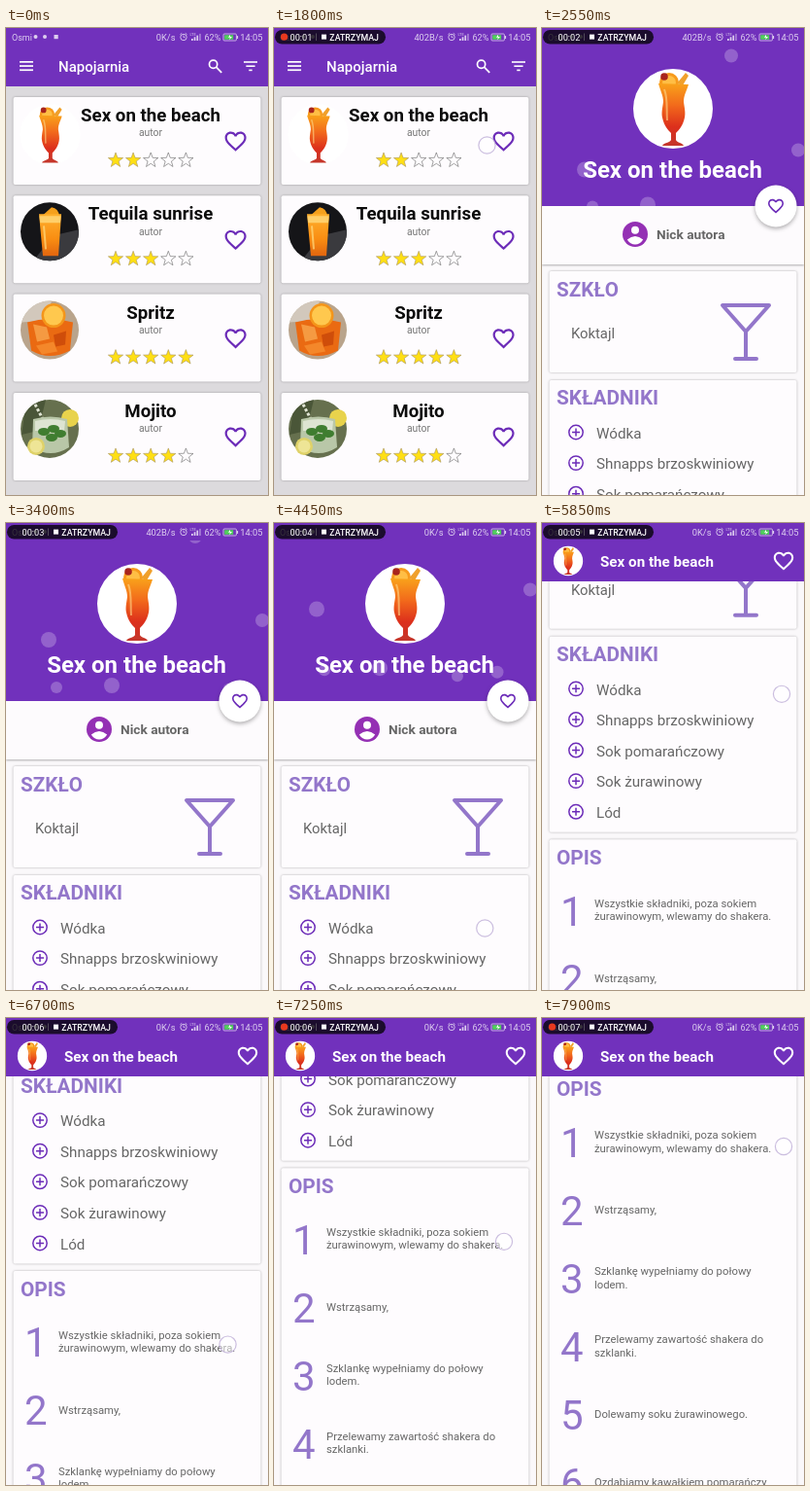
Recreate the animation shown at these times as an HTML page. Size 270 by 480 pixels, loop 8 s.

```html
<!DOCTYPE html>
<html lang="pl">
<head>
<meta charset="utf-8">
<title>Napojarnia</title>
<style>
html, body { margin: 0; width: 100%; height: 100%; overflow: hidden; background: #dcdadd; }
svg { display: block; width: 100vw; height: 100vh; font-family: Roboto, sans-serif; }
.b { font-weight: 700; }
.m { font-weight: 500; }
.mid { text-anchor: middle; }
.end { text-anchor: end; }
.card { fill: #fefcfe; filter: drop-shadow(0 .8px .8px rgba(0, 0, 0, .3)); }
.line { fill: none; stroke: #6c2cb8; stroke-width: 1.5; }
</style>
</head>
<body>
<svg id="stage" viewBox="0 0 270 480"></svg>
<script>
const LOOP = 8000;
const PURPLE = '#7131bc', ACCENT = '#6c2cb8', SOFT = '#9376ca', GREY = '#666';
const HEART = 'M16.5 3c-1.74 0-3.41.81-4.5 2.09C10.91 3.81 9.24 3 7.5 3 4.42 3 2 5.42 2 8.5c0 3.78 3.4 6.86 8.55 11.54L12 21.35l1.45-1.32C18.6 15.36 22 12.28 22 8.5 22 5.42 19.58 3 16.5 3zm-4.4 15.55l-.1.1-.1-.1C7.14 14.24 4 11.39 4 8.5 4 6.5 5.5 5 7.5 5c1.54 0 3.04.99 3.57 2.36h1.87C13.46 5.99 14.96 5 16.5 5c2 0 3.5 1.5 3.5 3.5 0 2.89-3.14 5.74-7.9 10.05z';

const text = (x, y, size, fill, str, cls = '', extra = '') =>
  `<text x="${x}" y="${y}" font-size="${size}" fill="${fill}" class="${cls}" ${extra}>${str}</text>`;
const rect = (x, y, w, h, fill, extra = '') =>
  `<rect x="${x}" y="${y}" width="${w}" height="${h}" fill="${fill}" ${extra}/>`;
const circle = (x, y, r, fill, extra = '') =>
  `<circle cx="${x}" cy="${y}" r="${r}" fill="${fill}" ${extra}/>`;
const path = (d, fill, extra = '') => `<path d="${d}" fill="${fill}" ${extra}/>`;
const group = (attrs, body) => `<g ${attrs}>${body}</g>`;
const card = (y, h) => `<rect class="card" x="7.5" y="${y}" width="255" height="${h}" rx="2"/>`;
const heart = (x, y, k, fill) =>
  path(HEART, fill, `transform="translate(${x} ${y}) scale(${k}) translate(-12 -12)"`);

function star(x, y, on) {
  const pts = Array.from({ length: 10 }, (_, i) => {
    const r = i % 2 ? 3.3 : 8, a = i * Math.PI / 5;
    return `${(x + r * Math.sin(a)).toFixed(2)},${(y - r * Math.cos(a)).toFixed(2)}`;
  });
  return `<polygon points="${pts.join(' ')}" fill="${on ? '#ffdf14' : '#fefcfe'}" stroke="${on ? '#a8935a' : '#666'}" stroke-width=".6"/>`;
}

// Round drink picture, centred on 0,0 with radius 41
const cocktail =
  circle(0, 0, 41, '#fff') +
  circle(-4, -27, 10, '#f79a1c') + circle(-4, -27, 7, '#ffbe45') +
  path('M4 -26L13 -37L16 -34L10 -24Z', '#f0a02c') + circle(-9, -33, 3.8, '#a8241c') +
  path('M-15 -26C-13 -18 -10 -14 -10 -7C-11 0 -12 4 -11 9C-9 18 -5 22 -2 25V32C-3 35 -10 35 -11 38H11C10 35 4 35 3 32V25C6 22 10 18 12 9C13 4 12 0 11 -7C11 -14 14 -18 16 -25Z', 'url(#drink)') +
  path('M-9 -20C-5 -10 -7 0 -6 12', 'none', 'stroke="#ffd98a" stroke-width="2" opacity=".6"');

const photos = [
  '',
  circle(0, 0, 30, '#151518') + path('M4 4L30 -2A30 30 0 0 1 -14 26.5Z', '#3a3a3e') +
    path('M-8 -16L2 -25Q9 -24 10 -16Z', '#f5a01d') +
    path('M-11 -18H12L9 25H-7Z', 'url(#juice)') + path('M-10.5 -16H11.5L11 -9H-9.8Z', '#ffcf6a') +
    path('M-6 -6L-4 18', 'none', 'stroke="#ffdc80" stroke-width="2" opacity=".7"'),
  circle(0, 0, 30, '#b9a48c') + path('M-29 -8A30 30 0 0 1 2 -30L-4 -10Z', '#d2c8bc') +
    path('M-23 -8Q0 -15 24 -8L21 21Q0 32 -19 21Z', '#ea6a12') + path('M-17 -6L-3 -3L0 9L-13 12Z', '#f59a42') +
    path('M4 5L17 1L16 15L6 17Z', '#cf4d0a') + path('M-14 16L4 12L8 22L-8 25Z', '#f4872a') +
    circle(4, -15, 12.5, '#f4951a') + circle(4, -15, 10, '#ffc84e'),
  circle(0, 0, 30, '#66704e') + path('M-26 -15A30 30 0 0 1 -4 -29.7L-12 2L-29 6Z', '#4a5638') +
    path('M-15 -25L-5 -6', 'none', 'stroke="#dfe3d2" stroke-width="3" stroke-dasharray="3 2"') +
    circle(21, -11, 9, '#e8d34c') +
    path('M-17 -10Q1 -15 18 -10L20 19Q1 31 -18 19Z', '#b9c7a8') +
    path('M-15 -8Q1 -12 16 -8L15 2H-15Z', '#dde4d2') +
    circle(-14, 18, 9, '#dfd269') + circle(-14, 18, 6.5, '#eee596') +
    [[-6, 3], [4, 0], [11, 5], [2, 9]].map(([x, y]) => `<ellipse cx="${x}" cy="${y}" rx="6" ry="4" fill="#3f7d30"/>`).join('')
];

const drinks = [['Sex on the beach', 2], ['Tequila sunrise', 3], ['Spritz', 5], ['Mojito', 4]];
const listRow = ([name, score], i) => group(`transform="translate(0 ${(i * 101.3).toFixed(1)})"`,
  card(71, 90) +
  (i ? group('transform="translate(45 108)"', photos[i]) : rect(7.5, 71, 255, 90, '#000', 'id="ripple"')) +
  text(149, 96, 18.7, '#0c0c0c', name, 'b mid') +
  text(149, 111.3, 10.4, '#777', 'autor', 'mid') +
  [0, 1, 2, 3, 4].map(k => star(113 + 18.1 * k, 136, k < score)).join('') +
  heart(236.6, 116.5, 1.1, ACCENT));

const list = rect(0, 0, 270, 480, '#dcdadd') + drinks.map(listRow).join('') +
  rect(0, 0, 270, 60, PURPLE) +
  [34, 38.2, 42.4].map(y => rect(14, y, 14, 1.7, '#fff')).join('') +
  text(54, 44.8, 15, '#fff', 'Napojarnia', 'm') +
  path('M216.8 40.4L222.2 45.8', 'none', 'stroke="#fff" stroke-width="1.8"') +
  circle(213.6, 37.2, 4.1, 'none', 'stroke="#fff" stroke-width="1.7"') +
  rect(245, 34.2, 14, 1.6, '#fff') + rect(247.4, 38.4, 9.2, 1.6, '#fff') + rect(250.3, 42.6, 3.4, 1.6, '#fff');

// x, y and radius at 3400 ms, then rise in px per second
const bubbles = [
  [44, 120, 8, 30], [109, 167, 8, 17], [52, 169, 6, 17], [195, 14, 7, 17],
  [264, 100, 7, 30], [189, 191, 6, 32], [230, 171, 6.5, 17]
];

const items = ['Wódka', 'Shnapps brzoskwiniowy', 'Sok pomarańczowy', 'Sok żurawinowy', 'Lód'];
const steps = [
  ['Wszystkie składniki, poza sokiem', 'żurawinowym, wlewamy do shakera.'],
  ['Wstrząsamy,'],
  ['Szklankę wypełniamy do połowy', 'lodem.'],
  ['Przelewamy zawartość shakera do', 'szklanki.'],
  ['Dolewamy soku żurawinowego.'],
  ['Ozdabiamy kawałkiem pomarańczy']
];
const itemRow = (name, i) => {
  const y = 416 + 31.6 * i;
  return circle(35, y - .5, 7.2, 'none', 'class="line"') +
    path(`M31 ${y - .5}h8M35 ${y - 4.5}v8`, 'none', 'class="line"') +
    text(56, y + 5.7, 15.2, GREY, name);
};
const stepRow = (lines, i) => {
  const y = 643.5 + 70 * i, top = y + (lines.length > 1 ? -3.3 : 3.7);
  return text(19, y + 15.3, 42, SOFT, i + 1) +
    lines.map((s, k) => text(54, top + 13.4 * k, 11.3, GREY, s)).join('');
};

const page =
  rect(0, 183, 270, 60, '#fdfbfd', 'style="filter:drop-shadow(0 1px 1px rgba(0,0,0,.3))"') +
  rect(0, 0, 270, 183, PURPLE) +
  group('clip-path="url(#head)"', bubbles.map(b => circle(b[0], 0, b[2], '#fff', 'class="bubble" opacity=".24"')).join('')) +
  text(134.5, 154, 24, '#fff', 'Sex on the beach', 'b mid') +
  circle(96, 212, 13, '#9430b4') + circle(96, 207.8, 4, '#fff') +
  path('M87.8 217.5Q96 210.5 104.2 217.5Q101 222.5 96 222.5Q91 222.5 87.8 217.5Z', '#fff') +
  text(118, 217, 13.7, GREY, 'Nick autora', 'b') +
  card(250, 104) + text(15, 276, 20.6, SOFT, 'SZKŁO', 'b') + text(30, 318.7, 14.8, GREY, 'Koktajl') +
  path('M186 285H234L210 312ZM210 312V340M199 340H221', 'none', `stroke="${SOFT}" stroke-width="4" stroke-linejoin="round" stroke-linecap="round"`) +
  card(362, 201) + text(15, 387, 20.8, SOFT, 'SKŁADNIKI', 'b') + items.map(itemRow).join('') +
  card(570.5, 520) + text(15, 596.3, 20.8, SOFT, 'OPIS', 'b') + steps.map(stepRow).join('') +
  group('id="fab"', circle(0, 0, 21.5, '#fff', 'style="filter:drop-shadow(0 2px 2px rgba(0,0,0,.3))"') + heart(0, 0, .8, ACCENT));

const bar = rect(0, 18, 270, 42, PURPLE) +
  group('transform="translate(27 39) scale(.37)"', cocktail) +
  text(60, 44.6, 15.2, '#fff', 'Sex on the beach', 'b') + heart(249, 39, 1.02, '#fff');

const indicators =
  text(6, 13, 9, '#fff', 'Osmi') +
  circle(30.5, 9, 2, '#fff') + circle(40, 9, 2, '#fff') + rect(49.5, 7, 4.2, 4.2, '#fff') +
  text(174.5, 13, 9.3, '#fff', '', 'end', 'id="speed"') +
  circle(183, 9.5, 3.2, 'none', 'stroke="#fff" stroke-width=".9"') +
  path('M183 7.5V9.7H184.6M179.4 6.8L181.2 5.2M186.6 6.8L184.8 5.2', 'none', 'stroke="#fff" stroke-width=".8"') +
  text(189.5, 8, 4, '#fff', 'LTE') +
  [0, 1, 2, 3].map(i => rect(191 + 2.7 * i, 11 - 1.7 * i, 1.7, 2 + 1.7 * i, '#fff', i > 2 ? 'opacity=".5"' : '')).join('') +
  text(204.5, 13, 9.1, '#fff', '62%') +
  rect(224, 6, 13.4, 7, 'none', 'rx="1" stroke="#fff" stroke-width=".8"') + rect(237.8, 8, 1.3, 3, '#fff') +
  text(264.5, 13, 9.3, '#fff', '14:05', 'end');

const status = rect(0, 0, 270, 18, PURPLE) +
  group('opacity=".76"', indicators) +
  rect(225.2, 7.2, 9, 4.6, '#4fd05a') + path('M231 6.7L229 9.8H231L230 12.2L233 9H231Z', '#fff') +
  group('id="pill"',
    rect(1, 2, 114, 14.5, '#000', 'rx="7.2" opacity=".76"') +
    circle(10.5, 9.2, 3.6, '#e8391f', 'id="dot"') +
    text(16.5, 12.7, 9.2, '#fff', '', '', 'id="clock"') +
    rect(43, 5.5, .6, 7.5, '#777') + rect(49, 6.6, 5, 5, '#fff') +
    text(57.3, 12.6, 8.8, '#fff', 'ZATRZYMAJ', 'm'));

const grad = (id, stops) => `<linearGradient id="${id}" x2="0" y2="1">` +
  stops.map(([o, c]) => `<stop offset="${o}" stop-color="${c}"/>`).join('') + '</linearGradient>';

document.getElementById('stage').innerHTML = '<defs>' +
  grad('drink', [[0, '#f9a21b'], [.35, '#f26a1b'], [.7, '#dc2f1c'], [1, '#c4372c']]) +
  grad('juice', [[0, '#ffb02e'], [.6, '#f98d12'], [1, '#e2650f']]) +
  '<clipPath id="head"><rect width="270" height="183"/></clipPath></defs>' +
  group('id="list"', list) +
  group('id="detail"', rect(0, 0, 270, 480, '#faf8fa') + group('id="page"', page)) +
  group('id="hero"', cocktail) + group('id="bar"', bar) +
  circle(0, 0, 8.6, '#fff', 'id="touch" fill-opacity=".5" stroke="#b9a8d4" stroke-opacity=".75" stroke-width="1.2"') +
  status;

const el = {};
for (const node of document.querySelectorAll('svg [id]')) el[node.id] = node;
const bubbleEls = document.querySelectorAll('.bubble');
const set = (node, name, value) => node.setAttribute(name, value);

const span = (t, a, b) => Math.min(1, Math.max(0, (t - a) / (b - a)));
const ease = p => p * p * (3 - 2 * p);
const mix = (a, b, p) => a + (b - a) * p;

// Linear track over rows of [time, value, value...]
function track(rows, t, col = 1) {
  const i = rows.findIndex(r => r[0] > t);
  if (i === 0) return rows[0][col];
  if (i < 0) return rows[rows.length - 1][col];
  const a = rows[i - 1], b = rows[i];
  return mix(a[col], b[col], (t - a[0]) / (b[0] - a[0]));
}

const scrollKeys = [[4500, 0], [4900, 75], [5850, 245], [6150, 286], [6600, 291], [7250, 416], [7900, 516], [8000, 522]];
const touches = [
  [[1780, 219.5, 120.5], [1960, 219.5, 120.5]],
  [[4430, 217, 418], [4500, 218, 413], [4900, 228, 338], [5850, 247, 176], [6080, 250, 144]],
  [[6540, 226, 358], [6600, 227, 355], [7250, 237, 230], [7900, 249, 132], [8100, 250, 126]]
];

function draw(t) {
  const open = ease(span(t, 2000, 2450)), scroll = track(scrollKeys, t);
  set(el.ripple, 'opacity', .12 * span(t, 1850, 2000));
  set(el.detail, 'opacity', ease(span(t, 2050, 2450)));
  set(el.page, 'transform', `translate(0 ${-scroll})`);
  set(el.hero, 'transform', `translate(${mix(45.5, 135, open)} ${mix(109.5, 83, open) - scroll}) scale(${mix(.76, 1, open)})`);
  set(el.bar, 'opacity', span(scroll, 98, 123));
  set(el.fab, 'transform', `translate(241 183) scale(${1 - span(scroll, 90, 112)})`);
  bubbles.forEach((b, i) => set(bubbleEls[i], 'cy', b[1] - b[3] * (t - 3400) / 1000));

  const hold = touches.find(k => t >= k[0][0] && t < k[k.length - 1][0]);
  set(el.touch, 'visibility', hold ? 'visible' : 'hidden');
  if (hold) {
    set(el.touch, 'cx', track(hold, t, 1));
    set(el.touch, 'cy', track(hold, t, 2));
  }

  const blink = t < 2500 ? t + 500 : t + 140;
  set(el.pill, 'opacity', span(t, 40, 300));
  set(el.dot, 'visibility', blink % 1000 < 500 ? 'visible' : 'hidden');
  el.clock.textContent = '00:0' + Math.max(0, Math.floor((t - 300) / 1000));
  el.speed.textContent = t >= 950 && t < 3950 ? '402B/s' : '0K/s';
}

const start = performance.now();
function tick() {
  draw((performance.now() - start) % LOOP);
  requestAnimationFrame(tick);
}
draw(0);
requestAnimationFrame(tick);
</script>
</body>
</html>
```
